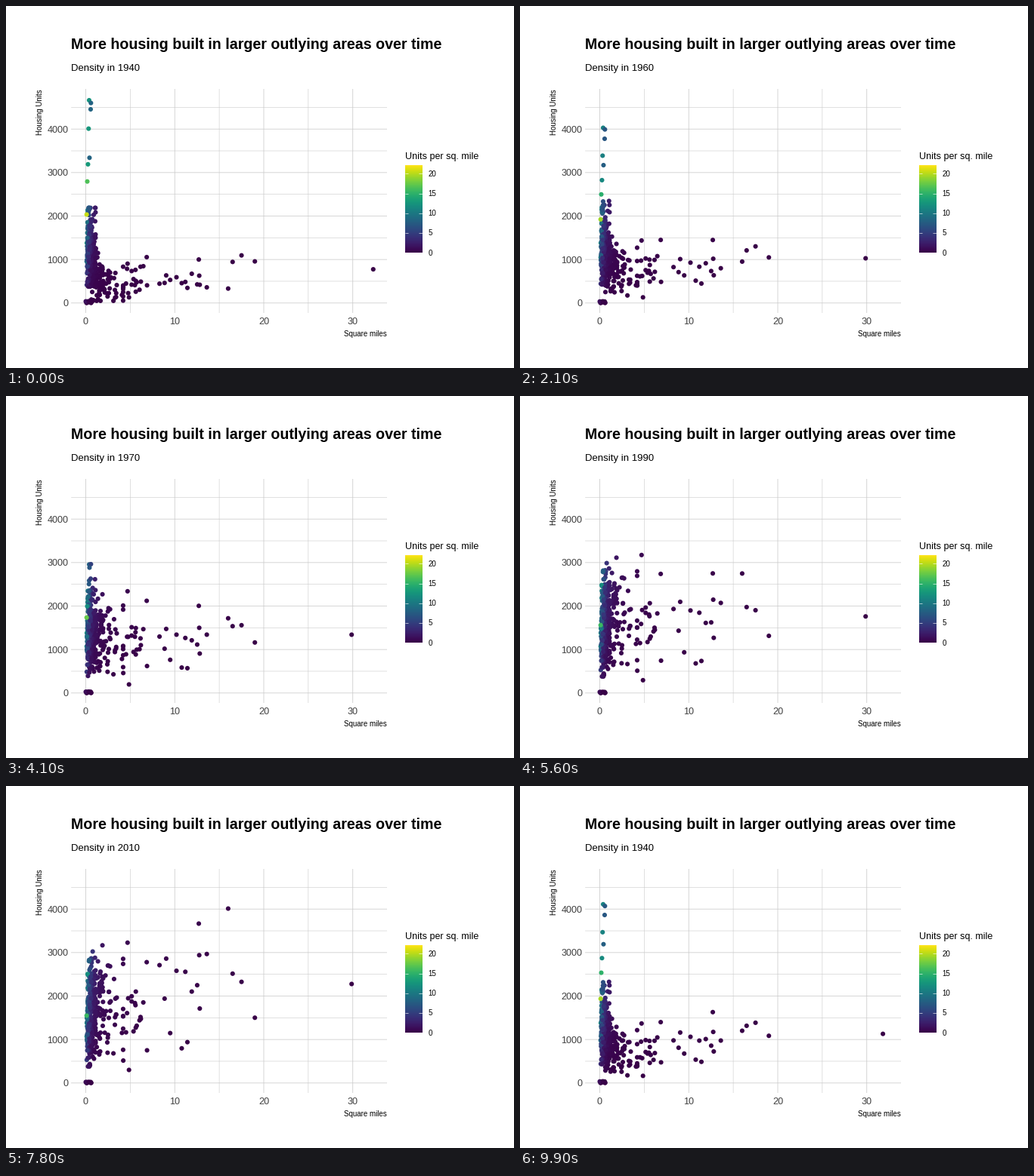
A matplotlib script that plays this animation: 672x480 px, repeating every 10000 ms.

```python
import numpy as np
import matplotlib.pyplot as plt
from matplotlib.animation import FuncAnimation
from matplotlib.colors import ListedColormap

W, H, DPI = 672, 480, 96
PT = 72 / DPI
YEARS = [*range(1940, 2011, 10), 2019]
N = len(YEARS)
MAX_DENSITY = 22.04

plt.rcParams["font.family"] = "Liberation Sans"
rng = np.random.default_rng(12)

# Viridis, slightly deepened
shades = plt.get_cmap("viridis")(np.linspace(0, 1, 256))[:, :3]
CMAP = ListedColormap(shades ** 1.15)
TICK_GRAY = "#404040"

# How far a tract has moved from its first to its last count, per year
T = np.arange(N)
S = np.clip(T / 5.5, 0, 1)
BOOM = S * S * (3 - 2 * S)          # post-war change, settled by 1990
SPRAWL = (T / (N - 1)) ** 1.25      # slow, late growth far out

# Extreme tracts: area, first count, last count
DENSE = [(0.38, 4663, 1900), (0.58, 4600, 1950), (0.55, 4455, 1500),
         (0.32, 4010, 1300), (0.42, 3340, 2600), (0.25, 3190, 1600),
         (0.17, 2795, 1500), (0.10, 2035, 1550)]
REMOTE = [(32.3, 775, 2550), (19.0, 957, 1600), (17.5, 1095, 2550),
          (16.5, 945, 2800), (16.0, 332, 4680), (12.7, 1000, 4150),
          (12.75, 628, 3360), (13.6, 360, 3440)]


def grow(x, start, end, curve, low=0):
    start, end = np.reshape(start, (-1, 1)), np.reshape(end, (-1, 1))
    return np.asarray(x), np.clip(start + (end - start) * curve, low, None)


def ranks(n, corr):
    """Two correlated sets of standard scores: first and last year."""
    a, b = rng.standard_normal((2, n)).clip(-2.1, 2.1)
    return a, corr * a + np.sqrt(1 - corr ** 2) * b


def empty(n):
    x = rng.uniform(0, 0.65, n)
    y = rng.exponential(18, n)
    return grow(x, y, y * 0.6, BOOM)


def city(n):
    x = rng.lognormal(np.log(0.42), 0.55, n).clip(0.1, 1.1)
    a, b = ranks(n, 0.6)
    x, y = grow(x, 1180 + 480 * a, 1480 + 520 * b, BOOM, 380)
    cap = x * 1000 * rng.uniform(8.5, 13, n)
    return x, np.minimum(y, cap[:, None])


def suburb(n):
    x = (0.6 + rng.exponential(1.0, n)).clip(0.6, 4.2)
    a, b = ranks(n, 0.5)
    first = (330 + 450 * np.exp(0.7 - x)) * (1 + 0.5 * a)
    return grow(x, first, 1780 + 540 * b, BOOM, 50)


def fringe(n):
    x = rng.uniform(4, 7, n)
    a, b = ranks(n, 0.6)
    return grow(x, 540 + 270 * a, 1750 + 720 * b, BOOM, 130)


def rural(n):
    x = np.linspace(8.2, 13, n) + rng.uniform(-0.2, 0.2, n)
    first = rng.uniform(300, 750, n)
    return grow(x, first, first + rng.uniform(250, 2900, n), SPRAWL)


groups = [empty(12), suburb(140), city(240), fringe(22), rural(11),
          grow(*np.transpose(REMOTE), SPRAWL),
          grow(*np.transpose(DENSE), BOOM)]
area = np.concatenate([x for x, _ in groups])
UNITS = np.vstack([y for _, y in groups])
AREA = np.repeat(area[:, None], N, axis=1)
AREA[:, 1:] = AREA[:, 1:].clip(max=29.87)    # largest tract shrinks in 1950
DENSITY = UNITS / AREA.clip(min=0.03) / 1000

fig = plt.figure(figsize=(W / DPI, H / DPI), dpi=DPI, facecolor="white")

# Full-size layer in pixel coordinates for text and legend
stage = fig.add_axes([0, 0, 1, 1])
stage.axis("off")


def label(x, y, text, px, **kw):
    return stage.text(x, y, text, fontsize=px * PT, **kw)


label(86.5, 57.3, "More housing built in larger outlying areas over time",
      19.65, weight="bold")
subtitle = label(86.5, 86.2, "", 13.1)
label(504, 437.6, "Square miles", 9.8, ha="right")
label(47.8, 110.5, "Housing Units", 9.8, ha="right", rotation=90,
      rotation_mode="anchor")
label(527.5, 202.6, "Units per sq. mile", 12.5)

# Pixel position of the data origin and pixels per unit
X0, Y0, SX, SY = 105.5, 393.8, 11.774, 0.05765
for v in range(0, 31, 10):
    label(X0 + v * SX, 421.6, str(v), 12.6, ha="center", color=TICK_GRAY)
for v in range(0, 4001, 1000):
    label(82.5, Y0 - v * SY + 4.6, str(v), 12.6, ha="right", color=TICK_GRAY)

BAR_L, BAR_R, BAR_T, BAR_B = 527.5, 550.5, 211.7, 327
stage.imshow(np.linspace(1, 0, 256)[:, None], cmap=CMAP, aspect="auto",
             extent=(BAR_L, BAR_R, BAR_B, BAR_T), interpolation="bilinear")
for v in range(0, 21, 5):
    y = BAR_B - v / MAX_DENSITY * (BAR_B - BAR_T)
    label(558.3, y + 3.6, str(v), 9.8)
    stage.hlines([y, y], [BAR_L, BAR_R - 4.6], [BAR_L + 4.6, BAR_R],
                 color="white", lw=0.6 * PT)
stage.set(xlim=(0, W), ylim=(H, 0))

# Scatter panel
LEFT, RIGHT, TOP, BOTTOM = 86.5, 504.3, 110.3, 407.3
ax = fig.add_axes([LEFT / W, 1 - BOTTOM / H,
                   (RIGHT - LEFT) / W, (BOTTOM - TOP) / H])
ax.axis("off")
ax.set(xlim=((LEFT - X0) / SX, (RIGHT - X0) / SX),
       ylim=((Y0 - BOTTOM) / SY, (Y0 - TOP) / SY))


def grid(draw, values, major):
    for v in values:
        draw(v, color="#cccccc", lw=(0.6 if v % major else 0.8) * PT,
             snap=False, zorder=0)


grid(ax.axvline, range(0, 31, 5), 10)
grid(ax.axhline, range(0, 4501, 500), 1000)
dots = ax.scatter(AREA[:, 0], UNITS[:, 0], c=DENSITY[:, 0], cmap=CMAP,
                  vmin=0, vmax=MAX_DENSITY, s=(6.1 * PT) ** 2, linewidths=0)

# Each year holds, then moves linearly to the next
MOVE_FROM = [5, 17, 29, 40, 51, 62, 73, 84, 95]
MOVE_TO = [11, 23, 34, 45, 56, 67, 78, 89, 100]
KEY_FRAMES = np.column_stack([MOVE_FROM, MOVE_TO]).ravel()
KEY_STATES = np.column_stack([T, T + 1]).ravel()


def update(frame):
    pos = np.interp(frame, KEY_FRAMES, KEY_STATES)
    i, t = int(pos), pos % 1

    def blend(a):
        return a[:, i] * (1 - t) + a[:, (i + 1) % N] * t

    dots.set_offsets(np.column_stack([blend(AREA), blend(UNITS)]))
    dots.set_array(blend(DENSITY))
    subtitle.set_text(f"Density in {YEARS[int(pos + 0.5) % N]}")
    return dots, subtitle


anim = FuncAnimation(fig, update, frames=100, interval=100,
                     repeat=True, repeat_delay=0, init_func=lambda: update(0))
plt.show()
```
